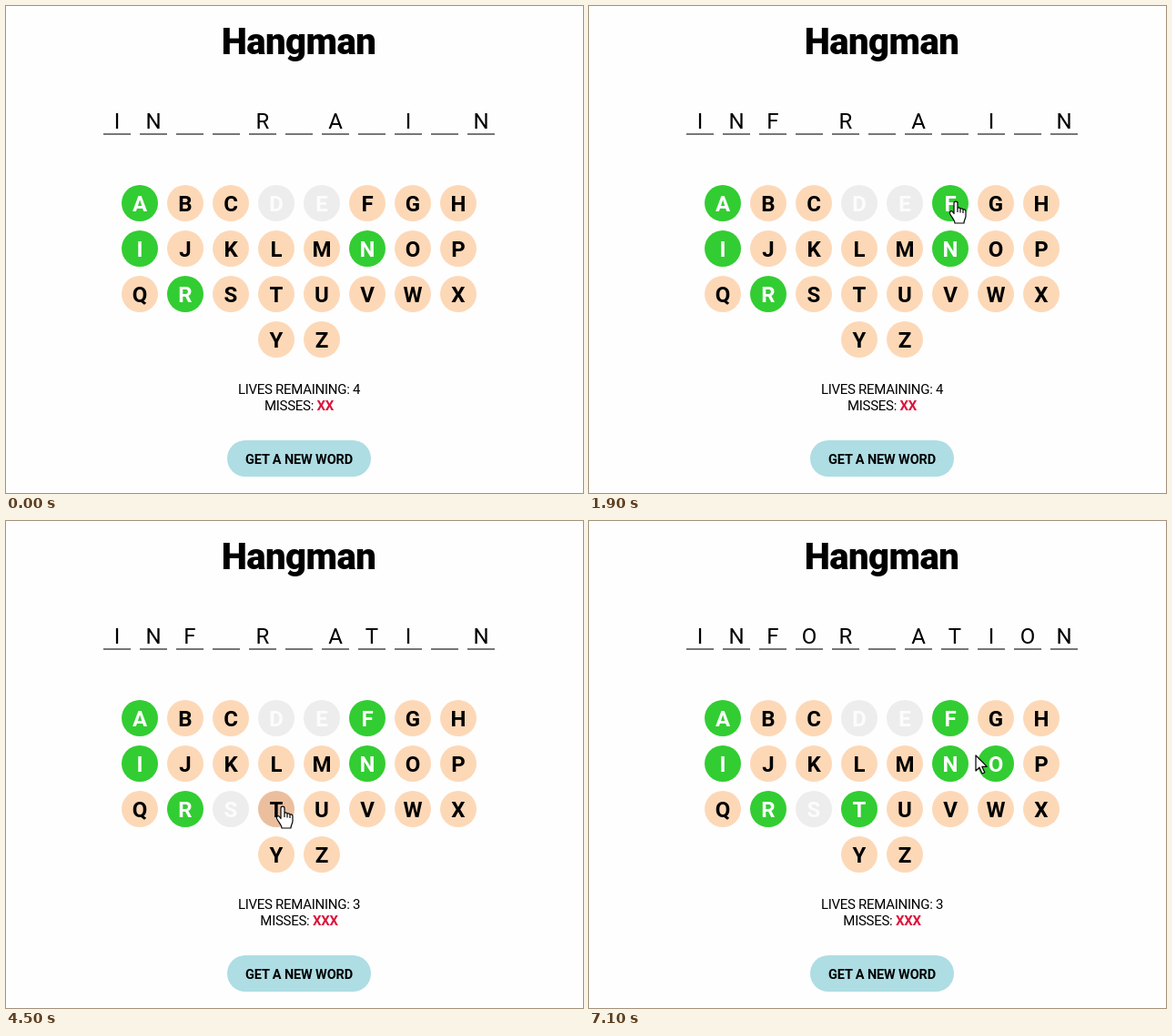
An HTML page that plays this animation: 634x536 px, repeating every 7200 ms.

```html
<!DOCTYPE html>
<html lang="en">
<head>
<meta charset="utf-8">
<title>Hangman</title>
<style>
html, body { margin: 0; width: 100%; height: 100%; overflow: hidden; background: #fefefe; }
svg { display: block; width: 634px; height: 536px; font-family: Roboto, "Open Sans", sans-serif; }
text { text-anchor: middle; white-space: pre; }
.title { font-size: 40px; font-weight: 900; letter-spacing: -.5px; }
.slot { font-size: 24px; }
.key { font-size: 24px; font-weight: 700; }
.info { font-size: 15px; letter-spacing: -.28px; }
.miss { font-weight: 700; fill: #dc143c; }
.new { font-size: 14.5px; font-weight: 700; letter-spacing: -.13px; }
.cursor { fill: #fff; stroke: #000; stroke-width: 1.2; stroke-linejoin: round; }
</style>
</head>
<body>
<svg id="stage" viewBox="0 0 634 536">
  <text class="title" x="321.5" y="53">Hangman</text>
  <g id="word"></g>
  <g id="keys"></g>
  <text class="info" x="322" y="427" id="lives"></text>
  <text class="info" x="322" y="445">MISSES: <tspan class="miss" id="misses"></tspan></text>
  <rect x="243" y="478" width="158" height="40" rx="20" fill="#aedde4"/>
  <text class="new" x="322" y="503.5">GET A NEW WORD</text>
  <g id="cursor" class="cursor">
    <path id="arrow" d="M0 0V17L4 13.2L7 20L9.8 18.8L6.8 12.3H12.3Z"/>
    <path id="hand" d="M-2 2C-2 -.6 2 -.6 2 2V8C2 6.5 5 6.5 5 8.5C5 7.5 8 7.5 8 9.5C8 8.5 11 8.5 11 11V16C11 19 9 20 9 24H-1C-1 21 -4 18 -6 14.5C-8 11.5 -5 10 -4 11L-2 13.5ZM2 8V12M5 8.5V12.5M8 9.5V13"/>
  </g>
</svg>
<script>
const LOOP = 7200, STEP = 100, FADE = 300;
const WORD = "INFORMATION";
const PEACH = [253, 216, 183], HOVER = [235, 191, 157];
const GREEN = [50, 205, 50], GREY = [237, 237, 237];
const BLACK = [0, 0, 0], WHITE = [252, 252, 252];

// When each letter is guessed; negative means before the loop begins.
const guessed = { A: -FADE, I: -FADE, N: -FADE, R: -FADE, D: -FADE, E: -FADE,
  F: 1600, S: 2900, T: 4500, O: 6500 };

// Pointer path: time, x, y
const path = [
  [200, 650, 540], [500, 590, 465], [800, 505, 350], [1100, 410, 228],
  [1300, 403, 215], [2100, 403, 215], [2300, 312, 268], [2500, 279, 291],
  [2800, 250, 313], [3400, 250, 313], [3800, 304, 314], [4800, 304, 314],
  [5200, 303, 312], [5600, 303, 312], [6000, 462, 274], [6200, 452, 264],
  [6900, 452, 264], [7100, 425, 258]
];

const byId = id => document.getElementById(id);
const clamp = v => Math.max(0, Math.min(1, v));
const mix = (a, b, k) => a.map((v, i) => v + (b[i] - v) * k);
const rgb = c => `rgb(${c.map(Math.round)})`;

function add(parent, tag, attrs, text = "") {
  const el = document.createElementNS("http://www.w3.org/2000/svg", tag);
  for (const name in attrs) el.setAttribute(name, attrs[name]);
  el.textContent = text;
  return parent.appendChild(el);
}

const slots = [...WORD].map((letter, i) => {
  const x = 122 + 40 * i;
  add(byId("word"), "rect", { x: x - 15, y: 140, width: 30, height: 2, fill: "#777" });
  return { letter, el: add(byId("word"), "text", { class: "slot", x, y: 135 }, letter) };
});

const keys = [..."ABCDEFGHIJKLMNOPQRSTUVWXYZ"].map((letter, i) => {
  const x = 147 + 50 * (i < 24 ? i % 8 : i - 21);
  const y = 217 + 50 * Math.floor(i / 8);
  const disc = add(byId("keys"), "circle", { cx: x, cy: y, r: 20 });
  const label = add(byId("keys"), "text", { class: "key", x, y: y + 8.5 }, letter);
  return { letter, x, y, disc, label };
});

const isGuessed = (letter, t) => letter in guessed && t >= guessed[letter];
const isOver = (key, p) => Math.hypot(p.x - key.x, p.y - key.y) < 20;

function pointerAt(t) {
  const next = path.findIndex(p => p[0] >= t);
  if (next < 0) return { x: path.at(-1)[1], y: path.at(-1)[2] };
  const b = path[next], a = path[Math.max(0, next - 1)];
  const k = b === a ? 0 : (t - a[0]) / (b[0] - a[0]);
  return { x: a[1] + (b[1] - a[1]) * k, y: a[2] + (b[2] - a[2]) * k };
}

// Hover shade builds up and fades over two steps.
function hoverLevel(key, t) {
  let level = 0;
  for (let s = 0; s <= t; s += STEP) {
    level = clamp(level + (isOver(key, pointerAt(s)) ? .5 : -.5));
  }
  return level;
}

function draw(t) {
  for (const { letter, el } of slots) {
    el.setAttribute("visibility", isGuessed(letter, t) ? "visible" : "hidden");
  }

  for (const key of keys) {
    const done = key.letter in guessed ? clamp((t - guessed[key.letter]) / FADE) : 0;
    const end = WORD.includes(key.letter) ? GREEN : GREY;
    const base = mix(PEACH, HOVER, hoverLevel(key, t));
    key.disc.setAttribute("fill", rgb(mix(base, end, done)));
    key.label.setAttribute("fill", rgb(mix(BLACK, WHITE, done)));
  }

  const misses = keys.filter(k => isGuessed(k.letter, t) && !WORD.includes(k.letter)).length;
  byId("lives").textContent = `LIVES REMAINING: ${6 - misses}`;
  byId("misses").textContent = "X".repeat(misses);

  const p = pointerAt(t);
  const onKey = keys.some(k => isOver(k, p));
  byId("cursor").setAttribute("transform", `translate(${p.x} ${p.y})`);
  byId("hand").setAttribute("display", onKey ? "inline" : "none");
  byId("arrow").setAttribute("display", onKey ? "none" : "inline");
}

const start = performance.now();
let shown = -1;
function tick() {
  const elapsed = (performance.now() - start) % LOOP;
  const t = Math.floor(elapsed / STEP) * STEP;
  if (t !== shown) draw(shown = t);
  requestAnimationFrame(tick);
}
tick();
</script>
</body>
</html>
```
